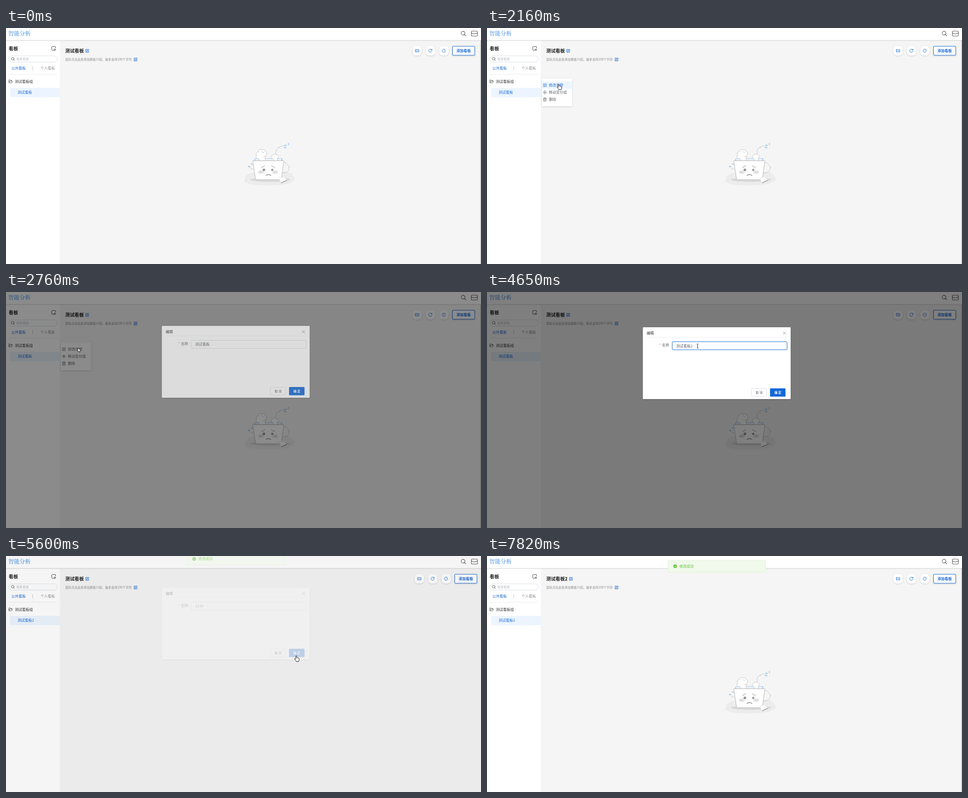
Animation of 1059x529 px, one loop 8.22 s. Source, as an HTML page:

```html
<!DOCTYPE html>
<html lang="zh-CN">
<head>
<meta charset="utf-8">
<title>看板</title>
<style>
html, body { margin: 0; width: 100%; height: 100%; overflow: hidden; background: #f5f5f5; }
svg { display: block; }
text { font: 8px "Noto Sans CJK SC", "Noto Sans CJK JP", "Noto Sans CJK", "Noto Sans", sans-serif; white-space: pre; }
.logo { font: 700 12.5px "Noto Serif CJK SC", "Noto Sans CJK SC", "Noto Sans CJK", serif; fill: #78aee8; }
.h { font-size: 10.4px; font-weight: 700; fill: #222; }
.s { font-size: 7px; }
.d { font-size: 6.85px; fill: #8c8c8c; }
.b { font-weight: 700; }
.m { text-anchor: middle; }
.blue { fill: #1b6ad6; }
.line { fill: none; stroke: currentColor; stroke-linecap: round; stroke-linejoin: round; }
</style>
</head>
<body>
<svg width="1059" height="529" viewBox="0 0 1059 529">
  <defs>
    <filter id="soft" x="-30%" y="-30%" width="160%" height="160%">
      <feDropShadow dx="0" dy="1" stdDeviation="1.6" flood-opacity=".2"/>
    </filter>
    <linearGradient id="fall" x2="0" y2="1">
      <stop stop-color="#d9d9d9"/><stop offset="1" stop-color="#d9d9d9" stop-opacity="0"/>
    </linearGradient>
    <g id="edit" class="line">
      <path d="M.5-3H-3.2V3.4H3.2V0M-1 1.2L-.7-.4 2.8-3.7 3.9-2.6.5.9Z"/>
    </g>
    <g id="lens" class="line"><circle cx="-.7" cy="-.7" r="3"/><path d="M1.6 1.6L3.6 3.6"/></g>
    <rect id="pill" x="-10.5" y="-10.5" width="21" height="21" rx="8" fill="#fff" filter="url(#soft)"/>
  </defs>

  <rect width="1059" height="529" fill="#f5f5f5"/>
  <rect y="27" width="120" height="502" fill="#fff"/>
  <rect width="1059" height="27" fill="#fff"/>
  <rect y="27" width="1059" height="3" fill="url(#fall)"/>
  <text class="logo" x="5" y="17">智能分析</text>
  <g color="#555">
    <use href="#lens" transform="translate(1020 12.5) scale(1.4)" stroke-width=".8"/>
    <g class="line" stroke-width="1.1"><rect x="1037.5" y="7" width="13.5" height="11" rx="1.5"/><path d="M1037.5 11C1041 13.6 1047.500 13.600 1051 11"/></g>
  </g>

  <!-- sidebar -->
  <text class="h" x="6" y="50">看板</text>
  <path class="line" color="#444" d="M107 50H103.500Q102 50 102 48.500V43Q102 41.500 103.500 41.500H109Q110.500 41.500 110.500 43V45M109 46.500V51M106.800 48.700H111.300"/>
  <rect x="6" y="62.500" width="108.500" height="14" rx="7" fill="#fff" stroke="#dcdfe6"/>
  <use href="#lens" transform="translate(15.500 69.500)" color="#555" stroke-width=".9"/>
  <text class="s" x="23" y="72" fill="#bbbec6">搜索看板</text>
  <text class="blue" x="12" y="93">公共看板</text>
  <path d="M59.500 85.500V95" stroke="#c8c8c8"/>
  <text x="77" y="93" fill="#8f8f8f">个人看板</text>
  <path d="M6 103.500H114" stroke="#ececec"/>
  <path class="line" color="#555" stroke-width=".9" d="M6.500 122.500V116.300H9L10 117.400H13V119M6.500 122.500L8 119H14.300L12.800 122.500Z"/>
  <text x="20" y="123" fill="#333">测试看板组</text>
  <rect x="9" y="134" width="111" height="21" fill="#ecf5ff"/>
  <text id="item" class="blue" x="26" y="147"></text>

  <!-- page head -->
  <text id="title" class="h" x="132" y="54.500"></text>
  <g color="#1b6ad6"><use id="pen" href="#edit"/><use href="#edit" x="288.800" y="70.500"/></g>
  <text class="d" x="132" y="73">鼠标点击此处添加看板介绍、最多支持100个字符</text>
  <g id="tools" color="#1b6ad6">
    <use href="#pill" x="916.500" y="51"/><use href="#pill" x="946.500" y="51"/><use href="#pill" x="976.500" y="51"/>
    <g class="line" stroke-width=".9">
      <rect x="912.500" y="48.300" width="8" height="5.400" rx=".6"/><path d="M914.500 50.300V51.800M916.500 50.300V51.800M918.500 50.300V51.800" stroke-width=".7"/>
      <path d="M949.300 49A3.700 3.700 0 1 0 949.700 51.800M949.800 47.300V49.400H947.600"/>
      <path d="M978 47.700A3.700 3.700 0 1 0 979.700 50.500M975.800 51.500L979.500 47.800"/>
    </g>
    <rect x="995.500" y="41" width="49.500" height="20" rx="1" fill="#fff" stroke="#1b6ad6" filter="url(#soft)"/>
    <text class="blue b m" x="1020.300" y="54">添加看板</text>
  </g>
  <rect id="bar" x="1057.500" y="28" width="1.500" height="501" fill="#c9c9cd"/>

  <!-- empty state -->
  <g id="empty">
    <path d="M531 343C533 330 540 326 552 324L622 322C634 323 640 328 644 338C642 350 615 352 588 353C560 353 534 351 531 343Z" fill="#ececec"/>
    <ellipse cx="589" cy="340" rx="45" ry="5" fill="#d9d9d9"/>
    <g class="line" color="#b5b5b5" stroke-width=".8">
      <path d="M602.500 285C600 273 604 266 620 264M620 301C630 304 634 315 629 321Q625 325 617 325M552 317Q543 315 543 310" stroke-dasharray="2 1"/>
      <path d="M555 298V292.500H614.500V298" fill="#e9f1fb" color="#a9c5e8"/>
      <path d="M564 297Q566 291 561 293Q555 290 558.500 285Q556 279 562 278Q565 270 571 273Q577 271 579 277Q584 282 579 287Q576 291 579 297Z" fill="#fff"/>
      <path d="M570 276Q571 280 575 279M574 288Q577 289 579 287"/>
      <path d="M596 297Q597 293 593 292Q589 288 594 285Q598 280 603 284Q609 285 607 291Q603 292 606 297Z" fill="#fff"/>
      <path d="M550.500 297.500H619.500L614 338Q613.700 340 611.500 340H559Q556.500 340 556.200 338Z" fill="#fff" stroke="#a5a5a5"/>
      <path d="M554 294.500V297M615 292.500V297" color="#8cbcf0" stroke-width="1.200"/>
      <path d="M608 336L620 334.500 626 341 614 347.500Z" fill="#fff" stroke="#e8e8e8"/>
      <path d="M614 347L625.500 341.500" color="#777" stroke-width="1.300"/>
    </g>
    <ellipse cx="568" cy="323" rx="7" ry="4" fill="#e6e6e6"/><ellipse cx="600" cy="323" rx="6.500" ry="4" fill="#e6e6e6"/>
    <g fill="#999"><circle cx="575" cy="318" r="3"/><circle cx="593.500" cy="318" r="2.500"/></g>
    <path class="line" color="#888" d="M569.500 312Q575 312.500 576.500 308M592 308Q593.500 312 599 312"/>
    <path class="line" color="#888" stroke-width="1.300" d="M579.500 330.500Q585 326.500 590.500 330.500"/>
    <path class="line" color="#aaa" stroke-width=".7" d="M565 323H570M598 324H599M602 324H603"/>
    <g class="line" color="#74b3f0">
      <path d="M620.500 262.500H625L620 268.500H625"/><path d="M628.500 258.500H631L628.500 262H631" stroke-width=".7"/>
      <path d="M541.500 308.800V312M539.900 310.400H543.100M548 303.800V306.200M546.800 305H549.200"/>
      <path d="M608.500 268.500H609M632.500 311.500H633" stroke-width="1.200"/>
    </g>
  </g>

  <!-- context menu -->
  <g id="menu">
    <rect x="122" y="113.500" width="67.500" height="62" rx="1" fill="#fff" filter="url(#soft)"/>
    <rect id="glow" x="122" width="67.500" height="16" fill="#ecf5ff"/>
    <g class="opt"><use href="#edit" x="129" y="128" stroke-width=".8"/><text x="138" y="131" fill="currentColor">修改名称</text></g>
    <g class="opt"><path class="line" stroke-width=".8" d="M129 140.500V148M125.300 144.200H132.700M128 141.500L129 140.500 130 141.500M128 147L129 148 130 147M126.300 143.200L125.300 144.200 126.300 145.200M131.700 143.200L132.700 144.200 131.700 145.200"/><text x="138" y="147" fill="currentColor">移动至分组</text></g>
    <g class="opt"><path class="line" stroke-width=".8" d="M125.500 158H132.500M127.500 158V156.500H130.500V158M126.300 158V164H131.700V158M128 160V162.200M130 160V162.200"/><text x="138" y="163" fill="currentColor">删除</text></g>
  </g>

  <rect id="shade" width="1059" height="529"/>

  <!-- dialog -->
  <g id="dialog">
    <rect x="347.500" y="79" width="329.500" height="161" rx="1" fill="#fff" filter="url(#soft)"/>
    <text x="356" y="95" fill="#333">编辑</text>
    <path class="line" color="#888" stroke-width=".9" d="M660.300 89.300L666.300 95.300M666.300 89.300L660.300 95.300"/>
    <path d="M356 101.500H669" stroke="#efefef"/>
    <text x="384.500" y="122" fill="#f56c6c">*</text><text x="390" y="122" fill="#606266">名称</text>
    <rect x="413" y="111.500" width="256" height="18" rx="2" fill="#fff" stroke="#dcdfe6"/>
    <rect id="focus" x="413" y="111.500" width="256" height="18" rx="2" fill="none" stroke="#1b6ad6"/>
    <text id="field" x="422" y="123.500" fill="#606266"></text>
    <rect x="589.500" y="216.500" width="34" height="17.500" rx="1.500" fill="#fff" stroke="#dcdfe6"/>
    <text class="s m" x="606.700" y="228" fill="#606266">取 消</text>
    <rect id="ok" x="631" y="216" width="34.500" height="18.500" rx="1.500"/>
    <text class="s m b" x="648.500" y="228" fill="#fff">确 定</text>
  </g>

  <g id="toast">
    <rect x="404" y="10" width="217" height="26.500" rx="2" fill="#f0f9eb" stroke="#e1f3d8"/>
    <circle cx="419.500" cy="23" r="4" fill="#67c23a"/>
    <path class="line" color="#fff" d="M417.600 23.100L419 24.500 421.500 21.700"/>
    <text x="429" y="26" fill="#67c23a">修改成功</text>
  </g>

  <g id="cursor">
    <path id="arrow" d="M.4.500V9.300L2.500 7.400 3.900 10.500 5.300 9.900 3.900 6.800H6.700Z" fill="#fff" stroke="#111" stroke-width=".8"/>
    <path id="hand" d="M-.9 1.200Q0-.4 1 1.200V5Q2.400 4.200 3 5.300Q4.300 4.700 4.800 5.800Q6.400 5.500 6.500 7V10Q6 11.500 5.400 12V13.600H-.1V12.400L-3.600 8.300Q-3.900 6.700-2.400 6.900L-.9 8.200Z" fill="#fff" stroke="#111" stroke-width=".9"/>
    <path id="beam" d="M-1.800-4.500H-.5L0-4 .5-4.500H1.800M0-4V4.500M-1.800 5H-.5L0 4.500 .5 5H1.800" fill="none" stroke="#111" stroke-width=".9"/>
  </g>
</svg>
<script>
const LOOP = 8220;
const el = {};
document.querySelectorAll('[id]').forEach(n => el[n.id] = n);
const options = [...document.querySelectorAll('.opt')];

// time, x, y
const path = [
  [0, 1025, 532], [70, 1025, 529], [870, 99, 161], [1130, 95, 152], [1400, 107, 145],
  [1770, 107, 145], [2160, 160, 125], [2850, 160, 125], [3400, 469.500, 121],
  [4650, 469.500, 121], [5250, 647, 223], [6680, 647, 223], [7480, 985, 482],
  [7510, 985, 482], [7820, 1028, 532], [LOOP, 1028, 532]
];

const clamp = v => Math.min(1, Math.max(0, v));
const curve = (a, b, s) => 3 * a * s * (1 - s) ** 2 + 3 * b * s * s * (1 - s) + s ** 3;

// cubic-bezier(.25, .1, .25, 1) over a time span
function ease(t, start, length) {
  const x = clamp((t - start) / length);
  if (x === 0 || x === 1) return x;
  let lo = 0, hi = 1;
  for (let i = 0; i < 24; i++) {
    const mid = (lo + hi) / 2;
    if (curve(.25, .25, mid) < x) lo = mid; else hi = mid;
  }
  return curve(.1, 1, lo);
}

function pointAt(t) {
  const i = Math.max(1, path.findIndex(p => p[0] > t));
  const [t0, x0, y0] = path[i - 1], [t1, x1, y1] = path[i];
  const u = clamp((t - t0) / (t1 - t0)), k = u * u * (3 - 2 * u);
  return [x0 + (x1 - x0) * k, y0 + (y1 - y0) * k];
}

const show = (node, on) => node.setAttribute('visibility', on ? 'visible' : 'hidden');
const fade = (node, v) => { node.setAttribute('opacity', v); show(node, v > 0); };
const shift = (node, x, y) => node.setAttribute('transform', `translate(${x} ${y})`);
const write = (node, s) => { if (node.textContent !== s) node.textContent = s; };

function cursorKind(t, x, y) {
  if (t < 2633) return t > 870 && y < 155 ? 'hand' : 'arrow';
  if (t > 5690) return 'arrow';
  if (x > 413 && x < 669 && y > 111 && y < 130) return 'beam';
  return x > 631 && y > 216 ? 'hand' : 'arrow';
}

function draw(t) {
  const [x, y] = pointAt(t);
  const loading = t >= 5490 && t < 5720;
  const renamed = t >= 5720;

  write(el.item, t >= 5490 ? '测试看板2' : '测试看板');
  write(el.title, renamed ? '测试看板2' : '测试看板');
  shift(el.pen, renamed ? 187 : 181, 51);
  shift(el.tools, loading ? 5 : 0, 0);
  show(el.bar, !loading);
  show(el.empty, !loading);

  fade(el.menu, ease(t, 1330, 200) - ease(t, 2850, 150));
  const hover = t > 1770 && t < 2600 && x > 122 ? (y > 136 ? 1 : 0) : -1;
  options.forEach((o, i) => o.setAttribute('color', i === hover ? '#1b6ad6' : '#606266'));
  el.glow.setAttribute('y', 120 + 16 * hover);
  fade(el.glow, hover < 0 ? 0 : 1);

  fade(el.shade, .5 * (ease(t, 2633, 200) - ease(t, 5470, 200)));
  const open = ease(t, 2633, 300) - ease(t, 5470, 300);
  fade(el.dialog, open);
  shift(el.dialog, 0, -11 * (1 - open));
  el.focus.setAttribute('opacity', ease(t, 3465, 200) - ease(t, 5250, 200));
  write(el.field, t >= 5470 ? '1234' : t >= 4010 ? '测试看板2' : '测试看板');
  const kind = cursorKind(t, x, y);
  el.ok.setAttribute('fill', t > 4650 && kind === 'hand' ? '#3d84e0' : '#1168d8');

  fade(el.toast, ease(t, 5505, 300));
  shift(el.toast, 0, -27 * (1 - ease(t, 5505, 400)));

  shift(el.cursor, x, y);
  for (const k of ['arrow', 'hand', 'beam']) show(el[k], k === kind);
}

const begin = performance.now();
function tick() {
  draw((performance.now() - begin) % LOOP);
  requestAnimationFrame(tick);
}
tick();
</script>
</body>
</html>
```
